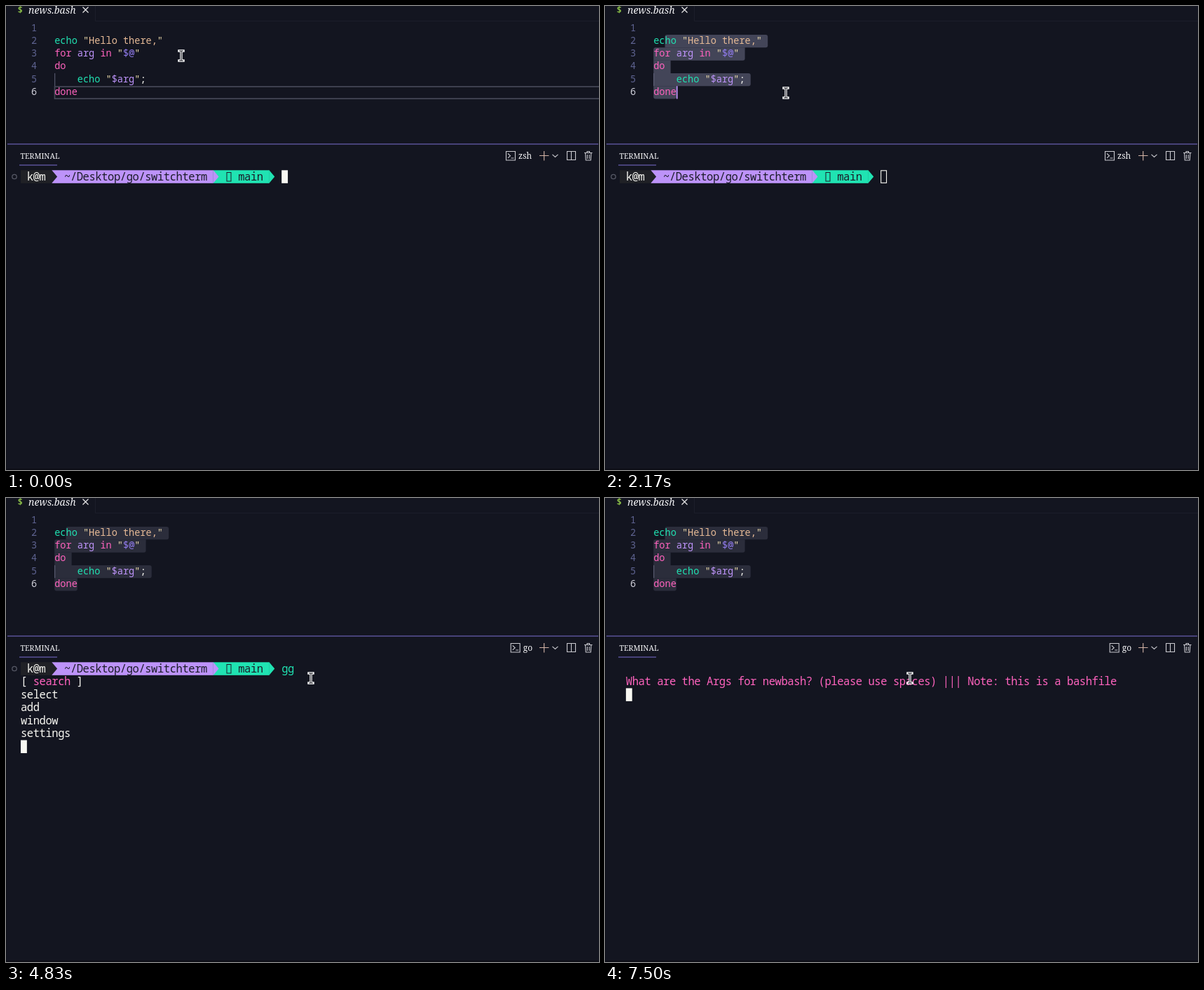
Write an HTML page that moves like this. It is 846x662 px and loops after 8000 ms.

```html
<!DOCTYPE html>
<html lang="en">
<head>
<meta charset="utf-8">
<title>Terminal session</title>
<style>
html, body { margin: 0; width: 100%; height: 100%; overflow: hidden; background: #131520; }
svg { display: block; width: 846px; height: 662px; }
text { white-space: pre; }
.code { font: 13.58px "Noto Sans Mono", monospace; }
.term { font: 15.5px "Noto Sans Mono", monospace; letter-spacing: -.438px; }
.ui { font-family: "Noto Serif", serif; fill: #f4f4f6; }
.icon { fill: none; stroke: #c9c9cf; stroke-width: 1.1; }
</style>
</head>
<body>
<svg viewBox="0 0 846 662">
  <rect width="846" height="662" fill="#131520"/>
  <path d="M127.5 0V21.5H846" fill="none" stroke="#1c1e2a"/>
  <path d="M.5 0V662" stroke="#0e0f18"/>
  <path d="M0 661H846" stroke="#0d0e16" stroke-width="2"/>
  <text x="16.5" y="10" class="code" style="font-size:12.5px;font-weight:bold" fill="#8dc149">$</text>
  <text x="32" y="10.5" class="ui" font-size="14" font-style="italic">news.bash</text>
  <path d="M109.5 1.5l8 8m0-8l-8 8" class="icon" style="stroke:#eee"/>

  <g id="editor"></g>

  <path d="M2 197H845" stroke="#7d70d2" stroke-width="1.2"/>
  <text x="20.5" y="217.5" class="ui" font-size="10.6">TERMINAL</text>
  <path d="M19 227H73" stroke="#7d70d2" stroke-width="1.2"/>
  <g id="shell">
    <path d="M713.5 207.5h13v12.5h-13zM716 210.5l3.5 3.2-3.5 3.2M720.5 217h4" class="icon"/>
    <text id="shellName" x="731" y="217.5" class="ui" font-size="12"></text>
  </g>
  <path d="M761 213.5h13.5M767.7 207v13.5" class="icon" style="stroke:#d3b3a6"/>
  <path d="M779.5 211.8l4 3.6 4-3.6M800.5 207.5h12v12h-12zM806.5 207.5v12" class="icon"/>
  <path d="M825 209.5h11.5M829 209.5v-2h3.5v2M826.5 209.5l.7 10.5h7l.7-10.5M829.3 212v6M832.2 212v6" class="icon"/>

  <g id="terminal"></g>

  <g id="mouse">
    <path d="M-3 -7H3M0 -7V7M-3 7H3" fill="none" stroke="#fff" stroke-width="3.4" stroke-linecap="square"/>
    <path d="M-3 -7H3M0 -7V7M-3 7H3" fill="none" stroke="#14151d" stroke-width="1.1"/>
  </g>
</svg>
<script>
const $ = id => document.getElementById(id);
const LOOP = 8000;
const PINK = '#ff63be', TEAL = '#20e3b2', PURPLE = '#bd93f9', WHITE = '#f8f8f2';
const QUOTE = '#f0dfae', STRING = '#e6ba96';

const esc = s => s.replace(/&/g, '&amp;').replace(/</g, '&lt;');
const span = ([s, color]) => `<tspan fill="${color}">${esc(s)}</tspan>`;
const text = (cls, x, y, parts) =>
  `<text class="${cls}" x="${x}" y="${Math.floor(y)}">${parts.map(span).join('')}</text>`;
const rect = (x, y, w, h, attrs) =>
  `<rect x="${x}" y="${y}" width="${w}" height="${h}" ${attrs}/>`;

// Editor
const EX = 69.2, EY = 22.6, EW = 8.15, EH = 18.32;
const code = [
  [],
  [['echo', TEAL], [' "', QUOTE], ['Hello there,', STRING], ['"', QUOTE]],
  [['for', PINK], [' arg', PURPLE], [' in', PINK], [' "', QUOTE], ['$@', '#937df0'], ['"', QUOTE]],
  [['do', PINK]],
  [['    echo', TEAL], [' "', QUOTE], ['$arg', PURPLE], ['"', QUOTE], [';', WHITE]],
  [['done', PINK]]
];
const lens = code.map(line => line.reduce((n, [s]) => n + s.length, 0));
const lineY = i => EY + i * EH;
const colX = c => EX + c * EW;

// Mouse stops: [time, x, y]
const moves = [
  [0, 250, 71], [330, 238, 68], [500, 190, 58], [670, 130, 51], [830, 92, 49], [1000, 87, 49],
  [1170, 87, 46], [1330, 85, 33], [1500, 120, 51], [1670, 165, 70], [1830, 205, 90],
  [2000, 240, 111], [2170, 258, 124], [2330, 258, 128], [2500, 258, 126],
  [2670, 345, 190], [2830, 435, 257]
];
const last = (list, t) => list.filter(k => k[0] <= t).pop();

const CLICK = 1000, RELEASE = 2500, REFOCUS = 3170;
const anchor = { line: 1, col: 2 };

function caretAt(t) {
  if (t < CLICK) return { line: 5, col: 0 };
  const [, x, y] = last(moves, Math.min(t, RELEASE));
  const line = Math.max(0, Math.min(5, Math.floor((y - EY) / EH)));
  return { line, col: Math.min(lens[line], Math.round((x - EX) / EW)) };
}

function selection(a, b, color) {
  if (a.line > b.line || (a.line === b.line && a.col > b.col)) [a, b] = [b, a];
  const rows = [];
  for (let i = a.line; i <= b.line; i++) {
    rows.push({
      y: lineY(i),
      l: colX(i === a.line ? a.col : 0),
      r: colX(i === b.line ? b.col : lens[i] + 1)
    });
  }
  return rows.map(({ y, l, r }, i) => {
    const up = rows[i - 1], down = rows[i + 1];
    const right = n => !n || n.r < r ? 3 : 0;
    const left = n => !n || n.l > l ? 3 : 0;
    const tr = right(up), br = right(down), tl = left(up), bl = left(down), end = y + EH + .1;
    return `<path fill="${color}" d="M${l + tl} ${y}H${r - tr}q${tr} 0 ${tr} ${tr}V${end - br}` +
      `q0 ${br} ${-br} ${br}H${l + bl}q${-bl} 0 ${-bl} ${-bl}V${y + tl}q0 ${-tl} ${tl} ${-tl}z"/>`;
  }).join('');
}

function editor(t) {
  const caret = caretAt(t);
  const selected = t >= CLICK && (caret.line !== anchor.line || caret.col !== anchor.col);
  let out = '';
  if (selected) out += selection(anchor, caret, t < REFOCUS ? '#434558' : '#2b2d3b');
  else out += rect(EX + .3, lineY(caret.line) + .9, 800, 17.1, 'fill="none" stroke="#464857" stroke-width="1.7"');
  out += rect(EX, lineY(4), 1, EH, `fill="${caret.line > 2 ? '#62647a' : '#2b2d3b'}"`);
  code.forEach((parts, i) => {
    const y = lineY(i) + 13.4;
    out += text('code', 36, y, [[String(i + 1), i === caret.line ? '#d0d0da' : '#5e6390']]);
    out += text('code', EX, y, parts);
  });
  if (t >= CLICK && t < 2670) out += rect(colX(caret.col), lineY(caret.line), 1.8, EH, `fill="${PURPLE}"`);
  return out;
}

// Terminal
const TX = 21, TY = 234.3, TW = 8.862, TH = 18.53;
const cellX = c => TX + c * TW;
const rowY = r => TY + r * TH;
const write = (c, r, ...parts) => text('term', cellX(c), rowY(r) + 14.8, parts);
const row = (r, ...parts) => write(0, r, ...parts);
const block = (c, r) => rect(cellX(c), rowY(r), TW, TH, `fill="${WHITE}"`);
const hollow = (c, r) =>
  rect(cellX(c) + .5, rowY(r) + .5, TW - 1, TH - 1, `fill="none" stroke="${WHITE}" stroke-width="1.1"`);
const arrow = (c, color) =>
  `<path fill="${color}" d="M${cellX(c) - .3} ${TY}h.3l7.8 ${TH / 2}l-7.8 ${TH / 2}h-.3z"/>`;
const band = (c, n, color) => rect(cellX(c), TY, n * TW, TH, `fill="${color}"`);

const DARK = '#202126', INK = '#1b1c28';
const prompt =
  '<circle cx="12" cy="243.5" r="3.2" fill="none" stroke="#575966" stroke-width="1.3"/>' +
  band(0, 5, DARK) + band(5, 26, PURPLE) + band(31, 9, TEAL) +
  arrow(5, DARK) + arrow(31, PURPLE) + arrow(40, TEAL) +
  rect(315, 237.5, 6, 12.5, `fill="none" stroke="${INK}"`) +
  row(0, [' k@m ', WHITE], ['  ~/Desktop/go/switchterm', INK], ['     main', INK]);
const typed = s => write(42, 0, [s, TEAL]);

function menu(top, active) {
  return ['search', 'select', 'add', 'window', 'settings'].map((name, i) =>
    i === active
      ? row(top + i, ['[ ', WHITE], [name, PINK], [' ]', WHITE])
      : row(top + i, [name, WHITE])).join('');
}
const help =
  row(0, ['[ ', WHITE], ['(q-quit) - (c-multiselection) - (r-remove) - (enter-select/execute) - (u-update tag) - down', PINK]) +
  row(1, ['t/right', PINK], [' ]', WHITE]) + menu(3, 1);

const screens = [
  [0, prompt + block(42, 0)],
  [CLICK, prompt + hollow(42, 0)],
  [REFOCUS, prompt + block(42, 0)],
  [4000, prompt + typed('g') + block(43, 0) + write(43, 0, ['g', INK])],
  [4170, prompt + typed('gg') + block(44, 0)],
  [4500, prompt + typed('gg') + block(0, 1)],
  [4830, prompt + typed('gg') + menu(1, 0) + block(0, 6)],
  [5670, help + block(0, 8)],
  [6330, help + row(8, ['[ newbash ]', WHITE]) + block(0, 9)],
  [7500, row(1, [' What are the Args for newbash? (please use spaces) ||| Note: this is a bashfile', PINK]) + block(1, 2)]
];

const shown = {};
function put(id, html) {
  if (shown[id] !== html) $(id).innerHTML = shown[id] = html;
}

function render(t) {
  const [, x, y] = last(moves, t);
  const go = t >= 4670;
  put('editor', editor(t));
  put('terminal', last(screens, t)[1]);
  put('shellName', go ? 'go' : 'zsh');
  $('shell').setAttribute('transform', `translate(${go ? 6.7 : 0} 0)`);
  $('mouse').setAttribute('transform', `translate(${x} ${y})`);
}

const start = performance.now();
function tick() {
  render((performance.now() - start) % LOOP);
  requestAnimationFrame(tick);
}
tick();
</script>
</body>
</html>
```
